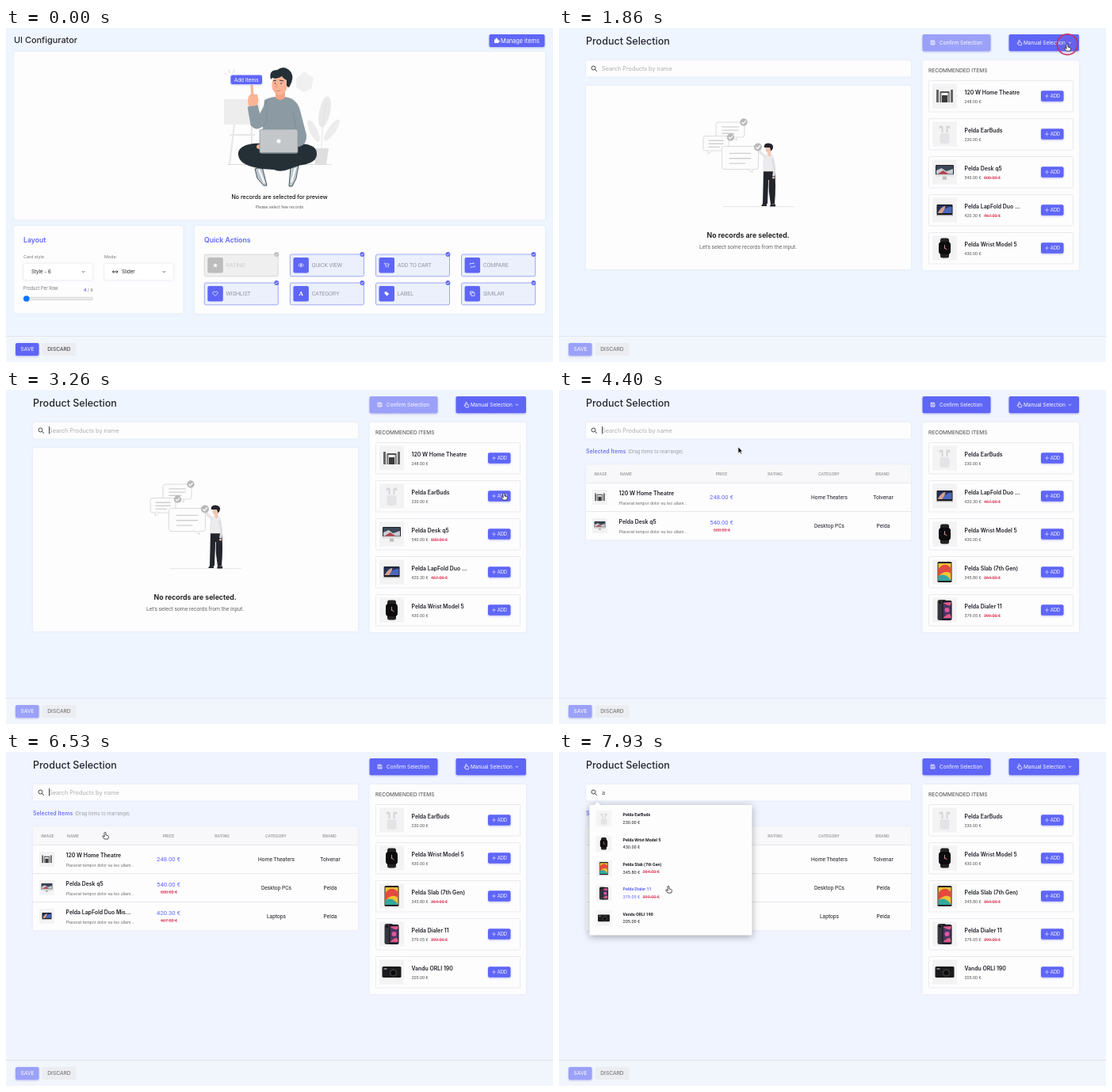
Animation of 690x422 px, one loop 8000 ms. Source, as an HTML page:

```html
<!DOCTYPE html>
<html lang="en">
<head>
<meta charset="utf-8">
<title>UI Configurator</title>
<style>
html, body { margin: 0; width: 690px; height: 422px; overflow: hidden; background: #eff5fe }
svg { display: block; position: absolute; inset: 0 }
text { font-family: Inter, sans-serif; white-space: pre }
.r { font-family: Roboto, sans-serif }
.m { text-anchor: middle }
.s { filter: drop-shadow(0 .8px 1.5px #5a6a901c) }
.b { filter: drop-shadow(0 1px 1.3px #4048d058) }
.pop { filter: drop-shadow(0 2px 5px #0005) }
</style>
</head>
<body>
<svg width="690" height="422" viewBox="0 0 690 422">
  <g id="page"></g>
  <path id="caret" stroke="#222" stroke-width=".8"/>
  <circle id="ring" cx="641.3" cy="20.8" fill="#c8305810" stroke="#c62f62" stroke-width="1.6"/>
  <path id="cursor" stroke-linejoin="round" stroke-linecap="round"/>
</svg>
<script>
const BLUE = '#5f66f6', PALE = '#9ba1f8', INK = '#1d1f24', GREY = '#777';
const $ = id => document.getElementById(id);

// Text is placed by the middle of its capitals.
const T = (x, y, size, text, fill = INK, attrs = '') =>
  `<text x="${x}" y="${y + size * .36}" font-size="${size}" fill="${fill}" ${attrs}>${text}</text>`;
const R = (x, y, w, h, fill, r = 0, attrs = '') =>
  `<rect x="${x}" y="${y}" width="${w}" height="${h}" rx="${r}" fill="${fill}" ${attrs}/>`;
const P = (d, fill = 'none', stroke = 'none', width = .8, attrs = '') =>
  `<path d="${d}" fill="${fill}" stroke="${stroke}" stroke-width="${width}" ${attrs}/>`;
const C = (x, y, r, fill, attrs = '') => `<circle cx="${x}" cy="${y}" r="${r}" fill="${fill}" ${attrs}/>`;
const E = (x, y, rx, ry, fill, turn = 0) =>
  `<ellipse cx="${x}" cy="${y}" rx="${rx}" ry="${ry}" fill="${fill}" transform="rotate(${turn} ${x} ${y})"/>`;
const at = (x, y, body, scale = 1) => `<g transform="translate(${x} ${y}) scale(${scale})">${body}</g>`;
const card = (x, y, w, h) => R(x, y, w, h, '#fdfdfe', 2, 'class="s"');
const button = (x, y, w, h, fill = BLUE) => R(x, y, w, h, fill, 2, 'class="b"');
const chevron = (x, y, color) => P(`M${x - 1.6} ${y - .8}l1.6 1.6 1.6-1.6`, 'none', color);
const tick = (x, y, r, fill) => C(x, y, r, fill) +
  at(x, y, P('M-1.5 0L-.4 1.2 1.7-1.2', 'none', '#fff', .8), r / 3);
const bold = 'font-weight="600"', medium = 'font-weight="500"', mid = 'class="m"', roboto = 'class="r"';
const HAND = 'M-1 1Q0-.6 1 1V4L3.8 4.8Q4.8 5.2 4.4 6.5L3.7 9H-.8L-3.2 6Q-3.4 4.8-2.2 5L-1 6Z';

// Pictures of the goods, drawn around 0,0 in a 31 px square
const art = {
  theatre: R(-10.5, -8, 3, 16, '#666') + R(7.5, -8, 3, 16, '#666') + R(-6.5, -4, 2.5, 12, '#888') + R(4, -4, 2.5, 12, '#888') +
    R(-3.5, -1, 7, 9, '#3a3a3a') + R(-6, -6, 12, 2, '#555'),
  buds: R(-6, -1, 12, 13, '#e4e4e6', 3) + P('M-3-2v-7q-3-2-3 2M3-2v-7q3-2 3 2', 'none', '#d4d4d7', 2),
  desk: R(-11.5, -9, 23, 14, '#20242c', 1) + R(-10.5, -8, 21, 10.5, '#3c4856') +
    P('M-10.5 2.5V-2L-4-5 2-1 10.5-4V2.5Z', '#c9ccd2') + P('M-9 2.5L-2-2 5 2.5Z', '#b5434e') +
    R(-11.5, 3, 23, 2.5, '#ddd') + P('M-2 5.5h4l1 4h-6z', '#bbb'),
  lap: R(-10, -7, 20, 13, '#17181c', 1) + R(-9, -6, 18, 10, '#22305c') + P('M-9 4Q-4-5 1-5Q0 1-3 4Z', '#d9a08a') +
    P('M-3 4Q1-5 9-4V4Z', '#4a68bd') + R(-10.5, 6, 21, 1.3, '#aaa'),
  wrist: R(-5.5, -12.5, 11, 25, '#222', 2.5) + R(-7.5, -8, 15, 16, '#0c0c0e', 4) +
    P('M0 0V-4M0 0l3 2', 'none', '#ddd', .7) + C(0, 0, .9, '#e66'),
  slab: R(-9, -13, 18, 26, '#222', 1.5) + R(-8, -11, 16, 22, '#f2c235') + P('M-8-4Q0-14 8-5V2Q0-4-8 6Z', '#e34b3f') +
    P('M-8 11V5Q2 0 8 11Z', '#35a8a0'),
  dialer: R(-9, -13, 11, 26, '#34363b', 2.5) + R(-3, -12, 12, 25, '#111', 2) + R(-2, -10.5, 10, 22, '#4b3566', 1) +
    P('M-2-9Q9-2 8-10M-2 10Q8 0 8 10Z', '#e05c86') + C(3, 0, 3, '#d95a9a') + C(-6, -9.5, 1.4, '#111'),
  camera: R(-12, -7, 24, 14, '#1a1a1c', 1.5) + C(2, 1, 5, '#333') + C(2, 1, 3, '#0a0a0a') + R(-10, -5, 4, 2, '#777')
};
const item = (pic, name, price, old, kind, brand) => ({ pic, name, price: price + ' €', old: old && old + ' €', kind, brand });
const goods = [
  item('theatre', '120 W Home Theatre', '248.00', '', 'Home Theaters', 'Tolvenar'),
  item('buds', 'Pelda EarBuds', '230.00'),
  item('desk', 'Pelda Desk q5', '540.00', '600.00', 'Desktop PCs', 'Pelda'),
  item('lap', 'Pelda LapFold Duo Mist', '420.30', '467.00', 'Laptops', 'Pelda'),
  item('wrist', 'Pelda Wrist Model 5', '430.00'),
  item('slab', 'Pelda Slab (7th Gen)', '345.80', '364.00'),
  item('dialer', 'Pelda Dialer 11', '379.05', '399.00'),
  item('camera', 'Vandu ORLI 190', '205.00')
];
const cut = (name, n) => name.length > 20 ? name.slice(0, n) + '...' : name;
const oldPrice = (x, y, size, text, attrs = roboto) =>
  text ? T(x, y, size, text, '#d8284c', attrs + ' text-decoration="line-through"') : '';

function footer(active) {
  return R(0, 389, 690, 33, '#f1f5fc') + R(0, 389, 690, .8, '#dde2ea') +
    button(12, 398, 29.5, 16, active ? BLUE : PALE) + T(27, 406, 6.6, 'SAVE', '#fff', mid) +
    R(45.5, 398, 43, 16, '#ebedf1', 2) + T(67, 406, 6.7, 'DISCARD', active ? '#333' : '#666', mid);
}

function seatedMan() {
  const skin = '#fbb497', dark = '#243036', wool = '#8c9ba3';
  return R(275, 90, 45, 32, '#ededed') + P('M288 122L282 172M310 122v50M282 135h32', 'none', '#e6e6e6', 2) +
    P('M366 64l10-9 12 8-3 14-10 4-9-6z', '#f0f0f0') +
    E(402, 106, 7, 20, '#e9e9e9', 12) + E(411, 129, 5, 16, '#ededed', 35) + E(388, 130, 5, 15, '#ececec', -25) +
    P('M398 152Q398 125 404 95', 'none', '#ddd') + P('M387 152h20l-3 20h-14z', '#dedede') +
    P('M279 172.5H411', 'none', '#d6d6d6') +
    P('M279 60l-3-3M282 57l-1-5M286 57l2-4', 'none', '#ccc', .7) +
    P('M314 178l9-3 5 20 1 4-4 0-8-9zM359 175l10-1-3 16-5 10-4 0z', '#bcc8cf', dark, .8) +
    P('M319 179l7 17M365 177l-5 18', 'none', '#fff', 2) +
    P('M293 160C292 150 306 145 322 146H366C382 146 393 149 392 160C391 170 380 172 369 174L358 178Q346 183 338 179L323 178C306 175 294 171 293 160Z', dark) +
    P('M326 91Q334 87 340 87H352Q367 89 371 104L379 135Q380 147 370 150H325Q322 120 326 91Z', wool) +
    P('M329 92L320 109 317 97 305 100 309 123Q317 133 329 119Z', wool, '#76868e', .5) +
    P('M362 106l5 26', 'none', '#76868e', .7) +
    P('M306 99Q303 88 309 83L317 84Q320 92 316 98Z', skin) + P('M311 86L310 73', 'none', skin, 3.2, 'stroke-linecap="round"') +
    P('M340 77h12v11q-6 6-12 0z', '#f3a386') + E(345, 72, 9.8, 12.5, skin) + E(356, 72, 2.3, 3.3, skin) +
    P('M334 65Q331 53 342 53Q350 47 357 53Q364 59 360 69L357 75 354 73 354 66Q350 64 348 61Q342 65 336 63Z', dark) +
    C(339.5, 70, .8, dark) + C(347, 70, .8, dark) +
    P('M337 67l4-1M345 66l5 1', 'none', dark, 1) + P('M342 71l-1.5 4 2 .5', 'none', '#d98468', .7) + P('M340.5 79q3 1.5 6-.5', 'none', '#c9664f', .7) +
    E(320, 150, 4, 3, skin) + R(320, 128, 48, 30, '#c3c7ca', 2, 'stroke="#8a9297" stroke-width=".7"') + R(322, 157, 45, 1.5, '#8a9297') +
    C(344, 143, 2.5, '#fff') + button(283.5, 59.5, 39.5, 11.5) + T(303.2, 65.2, 6.5, 'Add Items', '#fff', mid);
}

const glyphs = [
  ['RATING', P('M0-3.3L1-1 3.4-.8 1.6.9 2.1 3.3 0 2-2.1 3.3-1.6.9-3.4-.8-1-1Z', '#fff')],
  ['QUICK VIEW', P('M-4 0Q0-5 4 0Q0 5-4 0Z', 'none', '#fff') + C(0, 0, 1.3, '#fff')],
  ['ADD TO CART', P('M-4-3h1.5l1 4.5h4l1-3.5h-5.5M-1.5 3.2h1M2 3.2h1', 'none', '#fff')],
  ['COMPARE', P('M-3.5-.5v-2h6l-1.5-1.5M3.5.5v2h-6l1.5 1.5', 'none', '#fff')],
  ['WISHLIST', P('M0 3.3L-3.3 0A2 2 0 0 1 0-2.3A2 2 0 0 1 3.3 0Z', 'none', '#fff')],
  ['CATEGORY', T(0, 0, 9, 'A', '#fff', 'class="m" style="font-family:\'Noto Serif\',serif" font-weight="700"')],
  ['LABEL', P('M-3-3h3l3.4 3.4-3 3-3.4-3.4Z', '#fff')],
  ['SIMILAR', P('M-1.6-1.6h4.8v4.8h-4.8zM-1.6 1h-1.6v-4.2h4.4v1.6', 'none', '#fff')]
];

function configurator() {
  const tiles = glyphs.map(([label, glyph], i) => {
    const x = 250.3 + i % 4 * 108.1, y = i < 4 ? 286 : 322, on = i > 0;
    return R(x, y, 93, 27.8, on ? '#ebf0fc' : '#efefef', 2, `stroke="${on ? '#7d84f2' : '#cccccc'}" stroke-width=".7"`) +
      R(x + 4, y + 4, 19.5, 19.5, on ? BLUE : '#bcbcbc', 2) + at(x + 13.7, y + 13.7, glyph, .85) +
      T(x + 27.3, y + 13.4, 7, label, on ? '#666b78' : '#bbb', 'class="r" font-weight="300"') +
      tick(x + 91, y, 2.9, on ? BLUE : '#bcbcbc');
  }).join('');
  const select = x => R(x, 297.5, 87.5, 21, '#fff', 2, 'class="s" stroke="#ececf1" stroke-width=".6"') + chevron(x + 75.5, 308, '#333');
  return T(10, 15, 10.9, 'UI Configurator', '#24262e', medium) +
    button(609.5, 8, 70, 16) + P('M616 14.5h1.7a1.2 1.2 0 1 1 2 0h1.7v1.4a1 1 0 1 1 0 1.6v1.5h-5.4z', '#fff') +
    T(624, 16, 7.35, 'Manage items', '#fff') +
    card(10, 30, 670, 212) + seatedMan() +
    T(345, 213.3, 7.1, 'No records are selected for preview', '#111', mid + ' ' + medium) +
    T(345, 226.2, 4.95, 'Please select few records', '#555', mid) +
    card(10, 250, 213.5, 110.5) + card(238, 250, 442, 111) +
    T(22, 268, 8.7, 'Layout', BLUE, bold) + T(250, 268, 8.7, 'Quick Actions', BLUE, bold) +
    T(22, 289, 5.4, 'Card style:', GREY) + T(124, 289, 5.4, 'Mode:', GREY) +
    select(22) + select(124) + T(32, 308, 6.2, 'Style - 6') + T(146, 308, 6.2, 'Slider') +
    P('M134.5 308h6.5M136 306.5l-1.6 1.5 1.6 1.5M139.5 306.5l1.6 1.5-1.6 1.5', 'none', INK, .9) +
    T(22, 329.5, 5.5, 'Product Per Row:', GREY) +
    T(98, 331, 5.3, `<tspan fill="${BLUE}" font-weight="600">4</tspan> / 6`, GREY) +
    R(22, 340.3, 87.5, 3.2, '#ececec', 1.6, 'stroke="#bbb" stroke-width=".5"') + C(25.8, 342, 3.8, '#0a75ff') +
    tiles + footer(true);
}

function standingMan() {
  const dark = '#24242c', line = 'stroke="#d2d2d2" stroke-width=".8"';
  const bubble = (x, y, w, h, tail) => R(x, y, w, h, '#fcfcfc', 3, line) + P(tail, '#fcfcfc', '#d2d2d2') +
    [.3, .52, .74].map((k, i) => R(x + w * .2, y + h * k - .5, w * (i < 2 ? .6 : .45), 1.4, '#cfcfcf', .7)).join('');
  return bubble(198, 119, 36, 19, 'M224 138v4l-5-4') + bubble(182, 136.5, 32, 18.5, 'M188 155v4l5-4') +
    bubble(205.5, 149.5, 46, 29, 'M238 178.5l6 4v-4') +
    tick(233, 119, 4.7, '#b9b9b9') + tick(216.5, 138, 4.7, '#b9b9b9') +
    P('M207 225.7H297', 'none', '#ddd') +
    P('M258 178H272Q274 200 272 222L267 223 264 200 263 222 257 222Z', dark) + P('M264.5 192L264 221', 'none', '#e8e8ea', .9) +
    P('M257 222l-2 3h7v-3zM267 222.5l-1 3h7v-3z', dark) +
    P('M259 162Q264 156 269 160Q273 168 272 181L258 181Q257 170 259 162Z', '#ececee', '#dcdcdf', .5) +
    P('M261 164L256 159 251 154', 'none', '#e6e6e9', 3.4) + P('M269 165l3 13-1.5 9', 'none', '#dedee2', 2.8) +
    C(270.5, 189, 1.5, '#efc6b5') + P('M262 151h6l-1 11h-3z', '#efc6b5') + E(264, 153, 3.4, 4.5, '#efc6b5') +
    P('M259 151Q257.5 146 264 145.5Q272 146 269.5 153L267.5 155.5 266 151Z', dark) + tick(251, 150.5, 5, '#b9b9b9');
}

function suggestions(list, hover) {
  return `<g class="pop">${P('M44 68l4.5-5 4.5 5z', '#fff')}${R(38.5, 67, 205, 164.5, '#fdfdfe', 1)}</g>` +
    list.map((g, i) => {
      const y = 79.3 + 31.4 * i, on = i == hover;
      return R(46.5, y - 5, 20, 20, '#f4f4f4') + at(56.5, y + 5, art[g.pic], .62) +
        T(80.5, y, 5.3, g.name, on ? BLUE : INK, 'class="r" font-weight="700"') +
        T(80.5, y + 9.4, 5.6, g.price, on ? BLUE : INK, roboto) + oldPrice(105.5, y + 9.4, 5.5, g.old);
    }).join('');
}

function selection({ picks, typed, open, hover }) {
  const chosen = goods.filter(g => picks.includes(g.pic));
  const rest = goods.filter(g => !chosen.includes(g)).slice(0, 5);
  let html = R(0, 0, 690, 422, chosen.length ? '#f0f4fe' : '#eff5fe') +
    T(34, 16, 12.5, 'Product Selection', '#24262e', medium) +
    button(458.5, 8, 86, 21.3, chosen.length ? BLUE : PALE) +
    P('M469 16h4l1 1v4h-5zM470 16v1.6h2.5V16M470.3 21v-1.8h2.4V21', 'none', '#fff', .7) +
    T(480, 18.6, 6.4, 'Confirm Selection', '#fff') +
    button(567.5, 8, 88.5, 21.3) + at(580.5, 15, P(HAND, 'none', '#fff', 1), .75) +
    T(586, 18.6, 6.5, 'Manual Selection', '#fff') + chevron(644.5, 18.6, '#fff') +
    card(34, 41, 410, 20.5) + C(43.5, 50.5, 2.5, 'none', 'stroke="#333" stroke-width=".9"') + P('M45.3 52.3l2.6 2.6', 'none', '#333', .9) +
    (typed ? T(54, 51, 7.3, 'a', '#444') : T(54, 51, 7.3, 'Search Products by name', '#adadb2')) +
    card(458.5, 41, 197.5, 265) + T(466, 53.5, 6.6, 'RECOMMENDED ITEMS', '#444');

  rest.forEach((g, i) => {
    const y = 66.5 + 48 * i;
    html += R(466.5, y, 182, 39.5, '#fdfdfe', 1, 'stroke="#e4e6eb" stroke-width=".8"') +
      R(471, y + 4, 31, 31, '#f3f3f4') + at(486.5, y + 19.5, art[g.pic]) +
      T(511.5, y + 14.8, 6.9, cut(g.name, 18), INK, bold) +
      T(511.5, y + 26.5, 5.4, g.price, '#555', roboto) + oldPrice(536, y + 26.5, 5.4, g.old) +
      button(608, y + 12.7, 28.5, 13.6) + P(`M613 ${y + 19.5}h5m-2.5-2.5v5`, 'none', '#fff', .5) + T(619.7, y + 19.6, 5.8, 'ADD', '#fff');
  });

  if (!chosen.length) {
    html += card(34, 73, 410, 232) + standingMan() +
      T(238.5, 262, 8.8, 'No records are selected.', '#111', mid + ' ' + bold) +
      T(238.5, 276.6, 6.8, "Let's select some records from the input.", '#666', 'class="r m"');
  } else {
    html += T(34, 77.5, 7.1, 'Selected Items', BLUE, medium) + T(87, 78, 5.8, '(Drag items to rearrange)', '#9a9aa2') +
      card(34, 94.5, 410, 22.7 + 36 * chosen.length) + R(34, 94.5, 410, 22.7, '#f8f8fa');
    [['IMAGE', 52.5], ['NAME', 84.5], ['PRICE', 205], ['RATING', 272.5], ['CATEGORY', 340.5], ['BRAND', 408]].forEach(([name, x]) =>
      html += T(x, 106, 5.3, name, '#999', 'class="r m" font-weight="500"'));
    chosen.forEach((g, i) => {
      const y = 135.3 + 36 * i;
      html += R(34, y - 18.3, 410, .8, '#e3e4ea') + R(42, y - 9.5, 19, 19, '#f3f3f4') + at(51.5, y, art[g.pic], .6) +
        T(75.5, y - 4.7, 6.9, cut(g.name, 21), INK, bold) +
        T(75.7, y + 7.5, 5.05, 'Placerat tempor dolor eu leo ullam...', '#666') +
        T(205, g.old ? y - 4.5 : y, 7.7, g.price, BLUE, 'class="r m"') + oldPrice(205.5, y + 5.3, 5.4, g.old, 'class="r m"') +
        T(341, y, 6.7, g.kind, INK, 'class="r m"') + T(409, y, 6.7, g.brand, INK, 'class="r m"');
    });
  }
  return html + footer(false) + (open ? suggestions(rest, hover) : '');
}

// Pointer stops: time, x, y
const stops = [
  [60, 455, 190], [500, 500, 150], [1400, 641, 20], [2330, 641, 20], [3130, 628, 130], [3300, 628, 130], [3460, 624, 83],
  [3560, 624, 83], [3730, 626, 130], [4060, 626, 130], [4400, 226, 72], [4700, 150, 43], [5740, 150, 43], [6060, 126, 109],
  [6400, 126, 109], [6530, 125, 101], [6900, 150, 45], [7460, 150, 45], [7930, 138, 169], [8000, 138, 170]
];
function pointer(t) {
  const i = Math.max(1, stops.findIndex(s => s[0] > t));
  const [t0, x0, y0] = stops[i - 1], [t1, x1, y1] = stops[i];
  const k = Math.min(1, Math.max(0, (t - t0) / (t1 - t0))), e = k * k * (3 - 2 * k);
  return [x0 + (x1 - x0) * e, y0 + (y1 - y0) * e];
}

const shapes = {
  arrow: ['M0 0V8L1.9 6.3 3.2 9.1 4.5 8.5 3.2 5.8H5.7Z', '#111', '#fff', .6],
  hand: [HAND, '#fff', '#222', .8],
  beam: ['M-1.5-4Q0-4 0-3Q0-4 1.5-4M0-3V3M-1.5 4Q0 4 0 3Q0 4 1.5 4', 'none', '#555', .7]
};
function pointerKind(t, x, y) {
  if (t >= 1800 && x < 444 && y > 41 && y < 62) return 'beam';
  if (t > 5700) return 'hand';
  return y < 25 && x > 609 || t > 1800 && x > 608 && x < 637 && (y - 66) % 48 > 10 && (y - 66) % 48 < 27 ? 'hand' : 'arrow';
}

let shown = '';
function draw() {
  const t = performance.now() % 8000, [x, y] = pointer(t);
  const open = t >= 5740 && t < 6330 || t >= 7460;
  const state = {
    start: t < 1800,
    picks: [t >= 3530 && 'theatre', t >= 4060 && 'desk', t >= 6330 && 'lap'],
    typed: t >= 5530 && t < 6330 || t >= 7200,
    open,
    hover: open ? Math.floor((y - 66) / 31.4) : -1
  };
  const key = JSON.stringify(state);
  if (key != shown) {
    shown = key;
    $('page').innerHTML = state.start ? configurator() : selection(state);
  }
  const blink = t > 2000 && (t + 870) % 1000 < 590;
  $('caret').setAttribute('d', blink ? `M${state.typed ? 59 : 54.5} 46v9.5` : '');

  const k = (t - 1660) / 400;
  $('ring').setAttribute('r', 9 + 8 * Math.min(1, Math.max(0, k)));
  $('ring').setAttribute('opacity', k < 0 || k > 1 ? 0 : Math.min(1, (1 - k) * 2.5));

  const [d, fill, stroke, width] = shapes[pointerKind(t, x, y)], cursor = $('cursor');
  const attrs = { d: t < 60 ? '' : d, fill, stroke, 'stroke-width': width, transform: `translate(${x} ${y})` };
  for (const name in attrs) cursor.setAttribute(name, attrs[name]);
  requestAnimationFrame(draw);
}
draw();
</script>
</body>
</html>
```
